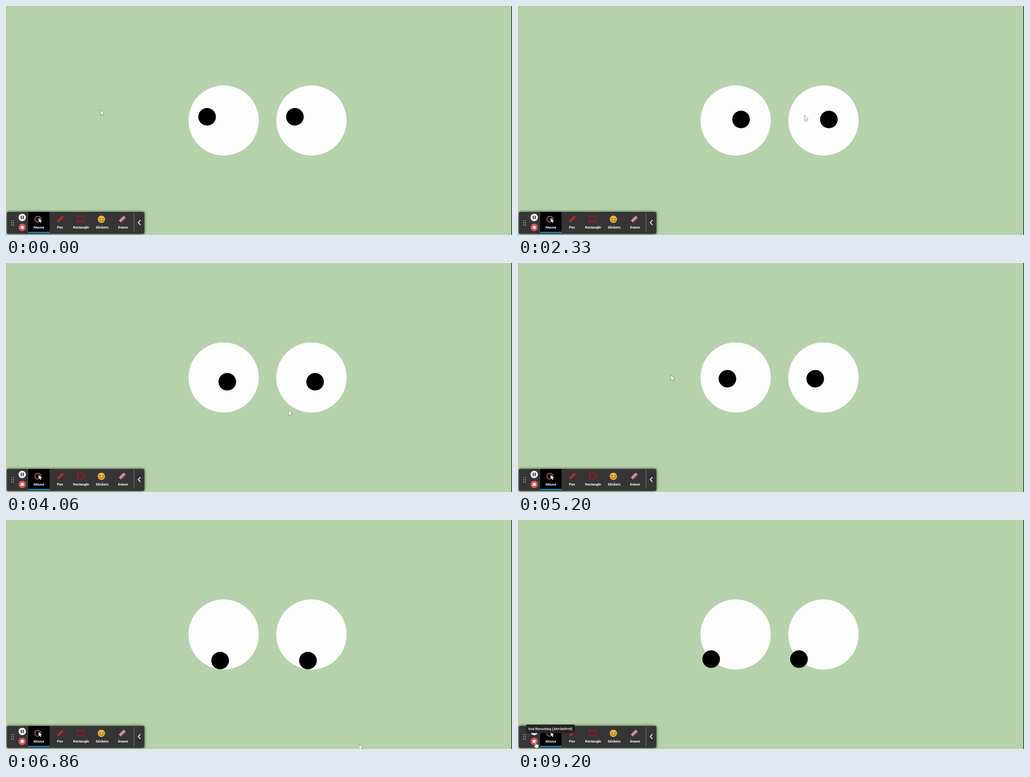
An HTML page with a canvas for the animation above (9.26 s loop, 1092x496 px).

```html
<!DOCTYPE html>
<html lang="en">
<head>
<meta charset="utf-8">
<title>Eyes following the pointer</title>
<style>
  html, body { margin: 0; width: 100%; height: 100%; overflow: hidden; background: #b5d2aa; }
  canvas { display: block; }
</style>
</head>
<body>
<canvas id="stage" width="1092" height="496"></canvas>
<script>
const W = 1092, H = 496, LOOP = 9260, LAG = 65;
const ctx = document.getElementById('stage').getContext('2d');

// Turning points of the pointer, joined by a smooth curve.
const turns = [
  { t: -65, x: 201, y: 213 }, { t: 0, x: 204, y: 225 },
  { t: 600, x: 582, y: 363 }, { t: 930, x: 750, y: 55 },
  { t: 1560, x: 275, y: 248 }, { t: 2060, x: 725, y: 245 },
  { t: 2330, x: 618, y: 237 }, { t: 3100, x: 278, y: 235 },
  { t: 3600, x: 672, y: 18 }, { t: 4060, x: 610, y: 319 },
  { t: 4300, x: 640, y: 242 }, { t: 4650, x: 655, y: -40 },
  { t: 4950, x: 520, y: 280 }, { t: 5200, x: 330, y: 243 },
  { t: 5600, x: 182, y: 208 }, { t: 6250, x: 770, y: 30 },
  { t: 6640, x: 469, y: 506 }, { t: 6860, x: 762, y: 486 },
  { t: 7300, x: 740, y: 66 }, { t: 7700, x: 700, y: 195 },
  { t: 8660, x: 50, y: 240 }, { t: 9130, x: 37, y: 480 }
];

function slope(i, axis) {
  const a = turns[i - 1], b = turns[i + 1];
  return a && b ? (b[axis] - a[axis]) / (b.t - a.t) : 0;
}

function pointerAt(t) {
  const next = turns.findIndex(k => k.t > t);
  if (next < 0) return turns[turns.length - 1];
  const i = Math.max(0, next - 1), a = turns[i], b = turns[i + 1];
  const d = b.t - a.t, u = Math.max(0, (t - a.t) / d), v = 1 - u;
  const blend = axis =>
    a[axis] * v * v * (1 + 2 * u) + b[axis] * u * u * (1 + 2 * v) +
    d * u * v * (slope(i, axis) * v - slope(i + 1, axis) * u);
  return { x: blend('x'), y: blend('y') };
}

// The eyes react late and keep the last spot seen inside the stage.
function gazeAt(t) {
  let s = t - LAG, p = pointerAt(s);
  while (p.y < 0 || p.y > H) p = pointerAt(s -= 5);
  return p;
}

function disc(x, y, r, color) {
  ctx.fillStyle = color;
  ctx.beginPath();
  ctx.arc(x, y, r, 0, 2 * Math.PI);
  ctx.fill();
}

function box(x, y, w, h, color, r = 0) {
  ctx.fillStyle = color;
  ctx.beginPath();
  ctx.roundRect(x, y, w, h, r);
  ctx.fill();
}

function label(text, x, y, weight) {
  ctx.font = `${weight} 7.6px Roboto, sans-serif`;
  ctx.textAlign = 'center';
  ctx.fillStyle = '#fff';
  ctx.fillText(text, x, y);
}

function shape(d, x, y, fill, stroke, width = 1) {
  const path = new Path2D(d);
  ctx.save();
  ctx.translate(x, y);
  ctx.lineWidth = width;
  ctx.lineJoin = ctx.lineCap = 'round';
  if (fill) { ctx.fillStyle = fill; ctx.fill(path); }
  if (stroke) { ctx.strokeStyle = stroke; ctx.stroke(path); }
  ctx.restore();
}

function tilted(x, y, paint) {
  ctx.save();
  ctx.translate(x, y);
  ctx.rotate(-Math.PI / 4);
  paint();
  ctx.restore();
}

const ARROW = 'M0 0V11.5L2.6 9.1L4.5 13.3L6.4 12.4L4.6 8.4H8Z';
const HAND = 'M0 1Q1 -1 2.2 1V5.5L6.5 6.3Q8.3 6.6 8 9L7 14H0.8L-3 9Q-3.2 7.4 -1.8 7.8L0 9Z';

function drawEyes(gaze) {
  const px = 413 + gaze.x / W * 114, py = 191 + gaze.y / H * 114;
  for (const dx of [0, 189.5]) {
    disc(469.7 + dx, 248, 75.9, '#fdfdfd');
    disc(px + dx, py, 19, '#000');
  }
}

function drawToolbar() {
  ctx.save();
  ctx.shadowColor = 'rgba(0,0,0,.7)';
  ctx.shadowBlur = 6;
  box(2, 446, 296.5, 47.5, '#353535', 3);
  ctx.restore();

  for (const x of [12, 16])
    for (const y of [465, 469.7, 474.4]) disc(x, y, 1.1, '#b4b4b4');

  disc(35, 458, 8, '#f1f1f1');
  for (const x of [32, 36]) box(x, 454.5, 2, 7, '#222');
  disc(35, 479.5, 8, '#dc525b');
  box(31.8, 476.3, 6.4, 6.4, '#fff', 1);

  box(48, 446, 46, 45.5, '#000');
  box(48, 489.3, 46, 2.2, '#169ce8');
  shape('M6.6 0A6.6 6.6 0 1 0 0 6.6', 69, 462, null, '#e8747c', 1.5);
  shape('M0 0V10L2.4 8L4 11.5L5.6 10.8L4.1 7.5H7Z', 70.5, 458.5, '#fff');

  tilted(117, 462, () => {
    box(-5, -2.3, 9, 4.6, '#e5222d', 1);
    box(4.7, -2.3, 3.3, 4.6, '#e5222d', 1);
    shape('M-5 -2.3L-8.5 0L-5 2.3Z', 0, 0, '#e5222d');
    box(-4, -.5, 7, 1, '#8d1a20');
  });

  ctx.strokeStyle = '#c90d18';
  ctx.lineWidth = 1.6;
  ctx.strokeRect(155, 455.8, 12.6, 12);

  disc(205.8, 462, 7.8, '#f8bd35');
  for (const x of [201.2, 210.4]) disc(x, 463.5, 2, '#f08a3a');
  shape('M-5 -1Q-3.3 -3.4 -1.7 -1M1.7 -1Q3.3 -3.4 5 -1M-3.5 2.5Q0 6 3.5 2.5',
    205.8, 462, null, '#62391c', 1.1);

  tilted(251, 461.5, () => {
    box(-7.5, -3.2, 15, 6.4, '#d98ea0', 1.5);
    box(-7.5, 1.2, 15, 2, '#b76e83', 1);
  });

  ['Mouse', 'Pen', 'Rectangle', 'Stickers', 'Eraser']
    .forEach((name, i) => label(name, 71 + i * 45.5, 481.7, 'bold'));

  box(275.8, 448, 1, 41, '#858585');
  shape('M2.3 -4.6L-2.3 0L2.3 4.6', 287.5, 469, null, '#fff', 1.7);
}

function drawPointer({ x, y }) {
  const overStop = Math.hypot(x - 35, y - 479.5) < 9;
  if (!overStop) return shape(ARROW, x, y, '#fff', '#777', .8);
  box(17, 443, 106, 18.5, '#252525', 3);
  label('End Recording (Alt+Shift+R)', 70, 454.7, 500);
  shape(HAND, x, y, '#fff', '#333', .8);
}

function draw(t) {
  box(0, 0, W, H, '#b5d2aa');
  box(0, 495.3, W, .7, '#c6d8be');
  drawEyes(gazeAt(t));
  box(1090.7, 0, 1.3, H, '#101410');
  drawToolbar();
  drawPointer(pointerAt(t));
}

// The picture advances fifteen times a second, on a 10 ms clock.
function frameTime(ms) {
  const n = Math.floor((Math.floor(ms / 10) * 10 + 9) * 3 / 200);
  return Math.floor(n * 20 / 3) * 10;
}

const start = performance.now();
function tick() {
  draw(frameTime((performance.now() - start) % LOOP));
  requestAnimationFrame(tick);
}
tick();
</script>
</body>
</html>
```
